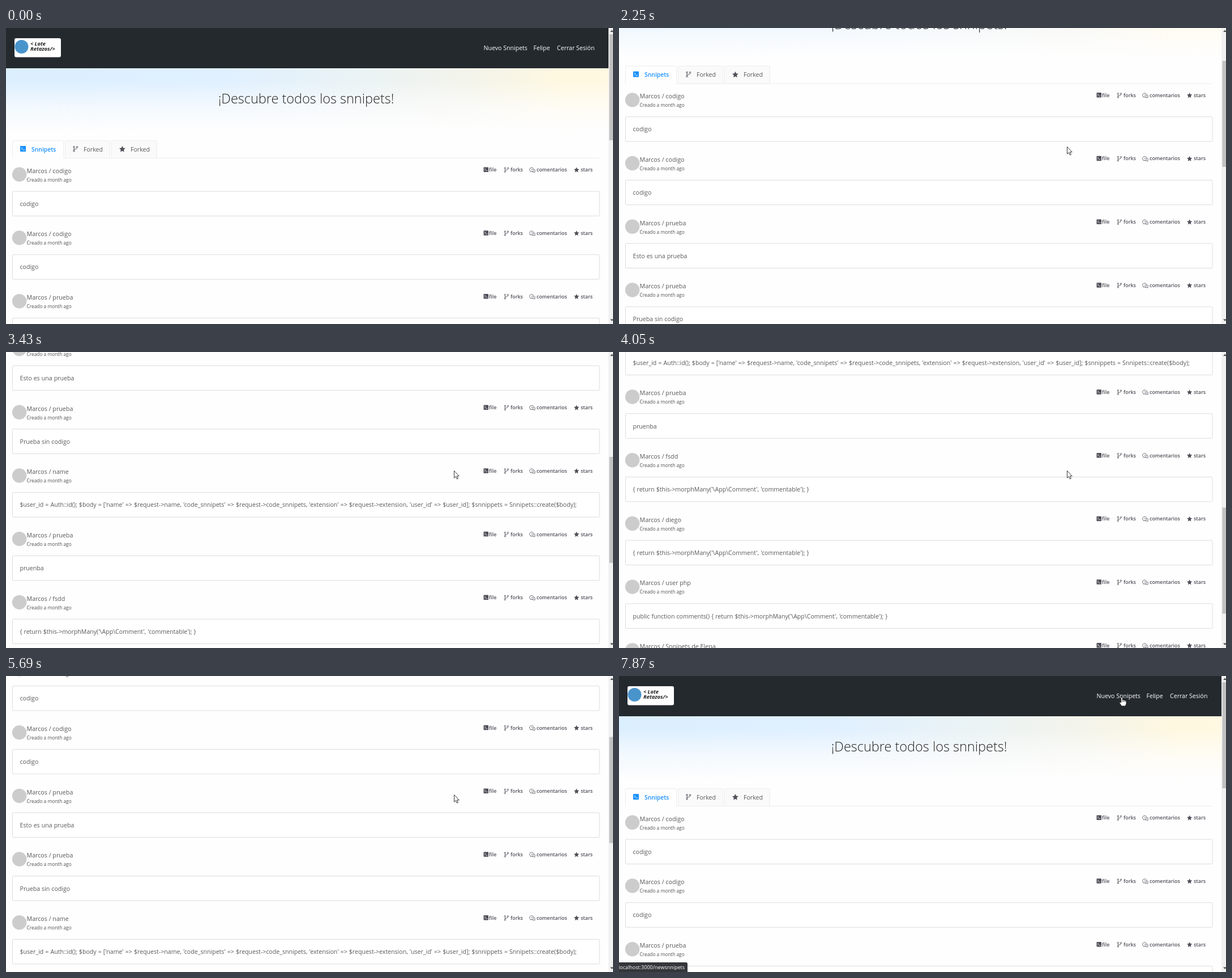
An HTML page for the animation above (8 s loop, 1072x522 px).

```html
<!DOCTYPE html>
<html lang="es">
<head>
<meta charset="utf-8">
<title>Listado</title>
<style>
  html, body { margin: 0; width: 100%; height: 100%; overflow: hidden; background: #fefefe; }
  svg { display: block; width: 1072px; height: 522px; }
  text { font-family: "Open Sans", "Noto Sans", sans-serif; font-size: 10.6px; fill: #595959; white-space: pre; }
  .nav { fill: #fff; }
  .hero { font-size: 23.5px; font-weight: 300; fill: #262626; text-anchor: middle; }
  .brand { font-size: 9.4px; font-weight: 700; font-style: italic; fill: #1c1c1c; }
  .active { font-size: 10.4px; font-weight: 600; fill: #1890ff; }
  .name { font-size: 10.7px; }
  .date { font-size: 8.34px; fill: #505050; }
  .body { word-spacing: .3px; }
  .action { font-size: 8.9px; font-weight: 600; fill: #50505a; }
  .status { font-size: 9px; fill: #fff; }
</style>
</head>
<body>
<svg id="stage" viewBox="0 0 1072 522" xmlns="http://www.w3.org/2000/svg">
  <defs>
    <linearGradient id="tint">
      <stop offset="0" stop-color="#dceffe"/>
      <stop offset=".36" stop-color="#e0f0ff"/>
      <stop offset=".6" stop-color="#ebf3f4"/>
      <stop offset=".78" stop-color="#f4f4ea"/>
      <stop offset=".93" stop-color="#fff8e0"/>
      <stop offset="1" stop-color="#fff8e2"/>
    </linearGradient>
    <linearGradient id="fade" x2="0" y2="1">
      <stop offset=".2" stop-color="#fefefe" stop-opacity="0"/>
      <stop offset=".6" stop-color="#fefefe" stop-opacity=".65"/>
      <stop offset="1" stop-color="#fefefe"/>
    </linearGradient>
    <!-- icons live in a 10 x 10 box -->
    <g id="file">
      <rect width="10" height="10" rx=".8" fill="currentColor"/>
      <path d="M2 2.5 4.2 4.6 2 6.7M5 7H8" fill="none" stroke="#fff"/>
    </g>
    <g id="fork" fill="none" stroke="currentColor">
      <circle cx="2" cy="1.7" r="1.2"/><circle cx="2" cy="8.8" r="1.2"/><circle cx="7.6" cy="1.9" r="1.2"/>
      <path d="M2 3V7.6M7.6 3.1C7.6 5 5 5.2 2 6.5"/>
    </g>
    <g id="chat" fill="none" stroke="currentColor" stroke-width=".9">
      <path d="M1 7.4A4 3.7 0 1 1 4.5 8.2L1.2 8.6Z"/>
      <path d="M8.6 4A3 3 0 0 1 9.7 8.2V9.8L8 9.3A4 3 0 0 1 4.4 8.4M3 4.6H6"/>
    </g>
    <path id="star" fill="currentColor" d="M5 0 6.5 3.3 10 3.7 7.4 6.2 8.1 9.8 5 8 1.9 9.8 2.6 6.2 0 3.7 3.5 3.3Z"/>
  </defs>
  <rect width="1072" height="522" fill="#fefefe"/>
  <g id="page"></g>
  <g id="scrollbar">
    <rect x="1064" width="8" height="522" fill="#f1f1f1"/>
    <rect id="thumb" x="1065.5" width="7" height="187" fill="#c1c1c1"/>
    <path d="M1067 7 1070 3.5 1073 7ZM1067 513.5 1070 517 1073 513.5Z" fill="#505050"/>
  </g>
  <g id="status">
    <path d="M0 505H118.5Q121 505 121 508V522H0Z" fill="#35363a"/>
  </g>
  <g id="arrow">
    <path d="M.5.5V13.2L3.4 10.5 5.4 15 7.4 14.1 5.4 9.8H9.2Z" fill="#fff" stroke="#222" stroke-width=".9"/>
  </g>
  <g id="hand">
    <path d="M-1.3 8.5V1Q0-.8 1.3 1V5.5Q3 4.4 3.6 6 5.2 4.6 5.9 6.6 7.8 5.6 8 8V11.5L6.5 16H-.5L-4 10.5Q-4 8-1.3 10Z" fill="#fff" stroke="#111" stroke-width=".9"/>
    <path d="M1.3 6V9M3.6 6.5V9M5.9 7V9" stroke="#111" stroke-width=".7"/>
  </g>
</svg>
<script>
const LOOP = 8000, ROW_GAP = 111.7;
const $ = id => document.getElementById(id);
const page = $("page");

function add(parent, tag, attrs, content) {
  const el = document.createElementNS("http://www.w3.org/2000/svg", tag);
  for (const key in attrs) el.setAttribute(key, attrs[key]);
  if (content) el.textContent = content;
  return parent.appendChild(el);
}
const rect = (parent, x, y, width, height, attrs) => add(parent, "rect", { x, y, width, height, ...attrs });
const label = (parent, x, y, content, cls = "") => add(parent, "text", { x, y, class: cls }, content);
const icon = (parent, name, x, y, scale, color) =>
  add(parent, "use", { href: "#" + name, transform: `translate(${x} ${y}) scale(${scale})`, color });

function buildHeader() {
  rect(page, 0, 71, 1064, 112, { fill: "url(#tint)" });
  rect(page, 0, 71, 1064, 113, { fill: "url(#fade)" });
  rect(page, 0, 0, 1064, 71, { fill: "#24292e" });
  rect(page, 15, 18, 82, 33.5, { rx: 3, fill: "#fff" });
  add(page, "circle", { cx: 27.5, cy: 33, r: 12, fill: "#4a94cc" });
  label(page, 43, 30.5, "< Lote", "brand");
  label(page, 43, 39.5, "Retazos/>", "brand");
  label(page, 843.5, 38.7, "Nuevo Snnipets", "nav");
  label(page, 931.5, 38.7, "Felipe", "nav");
  label(page, 973, 38.7, "Cerrar Sesión", "nav");
  label(page, 530, 133, "¡Descubre todos los snnipets!", "hero");
}

function buildTabs() {
  const edge = "#ededed";
  rect(page, 11, 229, 1037, 1, { fill: edge });
  const tabs = [[11, 91, "file", 25, "Snnipets", 45], [104, 80, "fork", 118, "Forked", 137], [186, 81, "star", 200, "Forked", 220]];
  tabs.forEach(([x, width, glyph, iconX, name, textX], i) => {
    const active = i === 0;
    rect(page, x + .5, 198.5, width - 1, 31, { rx: 2, fill: active ? "#fefefe" : "#fafafa", stroke: edge });
    if (active) rect(page, x + 1, 228, width - 2, 3, { fill: "#fefefe" });
    icon(page, glyph, iconX, 208, glyph === "star" ? 1.08 : 1, active ? "#1890ff" : "#50505a");
    label(page, textX, 217.8, name, active ? "active" : "");
  });
}

function buildRows() {
  const morph = "{ return $this->morphMany('\\App\\Comment', 'commentable'); }";
  const create = "$user_id = Auth::id(); $body = ['name' => $request->name, 'code_snnipets' => $request->code_snnipets, " +
    "'extension' => $request->extension, 'user_id' => $user_id]; $snnippets = Snnipets::create($body);";
  const rows = [
    ["codigo", "codigo"], ["codigo", "codigo"], ["prueba", "Esto es una prueba"],
    ["prueba", "Prueba sin codigo"], ["name", create], ["prueba", "pruenba"],
    ["fsdd", morph], ["diego", morph], ["user php", "public function comments() " + morph],
    ["Snnipets de Elena", ""]
  ];
  const actions = [["file", 843.5, "file", 853], ["fork", 879.5, "forks", 891],
    ["chat", 925, "comentarios", 937], ["star", 1003, "stars", 1015]];
  rows.forEach(([name, body], i) => {
    const row = add(page, "g", { transform: `translate(0 ${i * ROW_GAP})` });
    add(row, "circle", { cx: 23.6, cy: 258.3, r: 12.7, fill: "#ccc" });
    label(row, 36.5, 255.6, "Marcos / " + name, "name");
    label(row, 36.5, 270.6, "Creado a month ago", "date");
    for (const [glyph, x, text, textX] of actions) {
      icon(row, glyph, x, 245.5, glyph === "file" ? .85 : .92, "#50505a");
      label(row, textX, 253.2, text, "action");
    }
    rect(row, 11.5, 288, 1036.5, 43.5, { rx: 1.5, fill: "#fff", stroke: "#dcdcdc" });
    label(row, 24.5, 313.8, body, "body");
  });
}

buildHeader();
buildTabs();
buildRows();
label($("status"), -1, 517, "localhost:3000/newsnnipets", "status");

const smooth = u => u * u * (3 - 2 * u);

// Progress in equal steps: the first one shows at `start`, the last at `end`.
function stepped(t, start, end, count) {
  if (t < start) return 0;
  const step = Math.floor((t - start) / (end - start) * (count - 1) + .2);
  return Math.min(1, (step + 1) / count);
}

// start, end, steps, scroll from, scroll to, easing power
const scrolls = [
  [1250, 1950, 10, 0, 130, 1.15],
  [2250, 3030, 11, 130, 455, 1.355],
  [3350, 4200, 12, 455, 756, .89],
  [4450, 4750, 5, 756, 878, 1],
  [5070, 6080, 14, 878, 0, 1.042]
];

function scrollAt(t) {
  let y = 0;
  for (const [start, end, count, from, to, power] of scrolls)
    if (t >= start) y = from + (to - from) * smooth(stepped(t, start, end, count) ** power);
  return y;
}

function pointerAt(t) {
  if (t < 7080) {
    const left = 1 - (stepped(t, 500, 640, 3) - 1 / 3) * 1.5;
    return [791 + 145 * left, 209 + 262 * left];
  }
  const u = stepped(t, 7080, 7630, 8);
  return [791 - 74 * u + 171 * u * u, 209 - 172 * smooth(u)];
}

const show = (el, opacity) => el.setAttribute("opacity", opacity);
const move = (el, x, y) => el.setAttribute("transform", `translate(${x} ${y})`);

function render(t) {
  const scroll = scrollAt(t);
  move(page, 0, -scroll);
  $("thumb").setAttribute("y", 11 + scroll * .357);

  const [x, y] = pointerAt(t);
  const overLink = t >= 7080 && y < 42;
  move($("arrow"), x, y);
  move($("hand"), x, y);
  show($("arrow"), t >= 500 && !overLink ? 1 : 0);
  show($("hand"), overLink ? 1 : 0);
  show($("status"), stepped(t, 7790, 7870, 2));
}

let origin;
function tick(now) {
  origin ??= now;
  render((now - origin) % LOOP);
  requestAnimationFrame(tick);
}
render(0);
requestAnimationFrame(tick);
</script>
</body>
</html>
```
